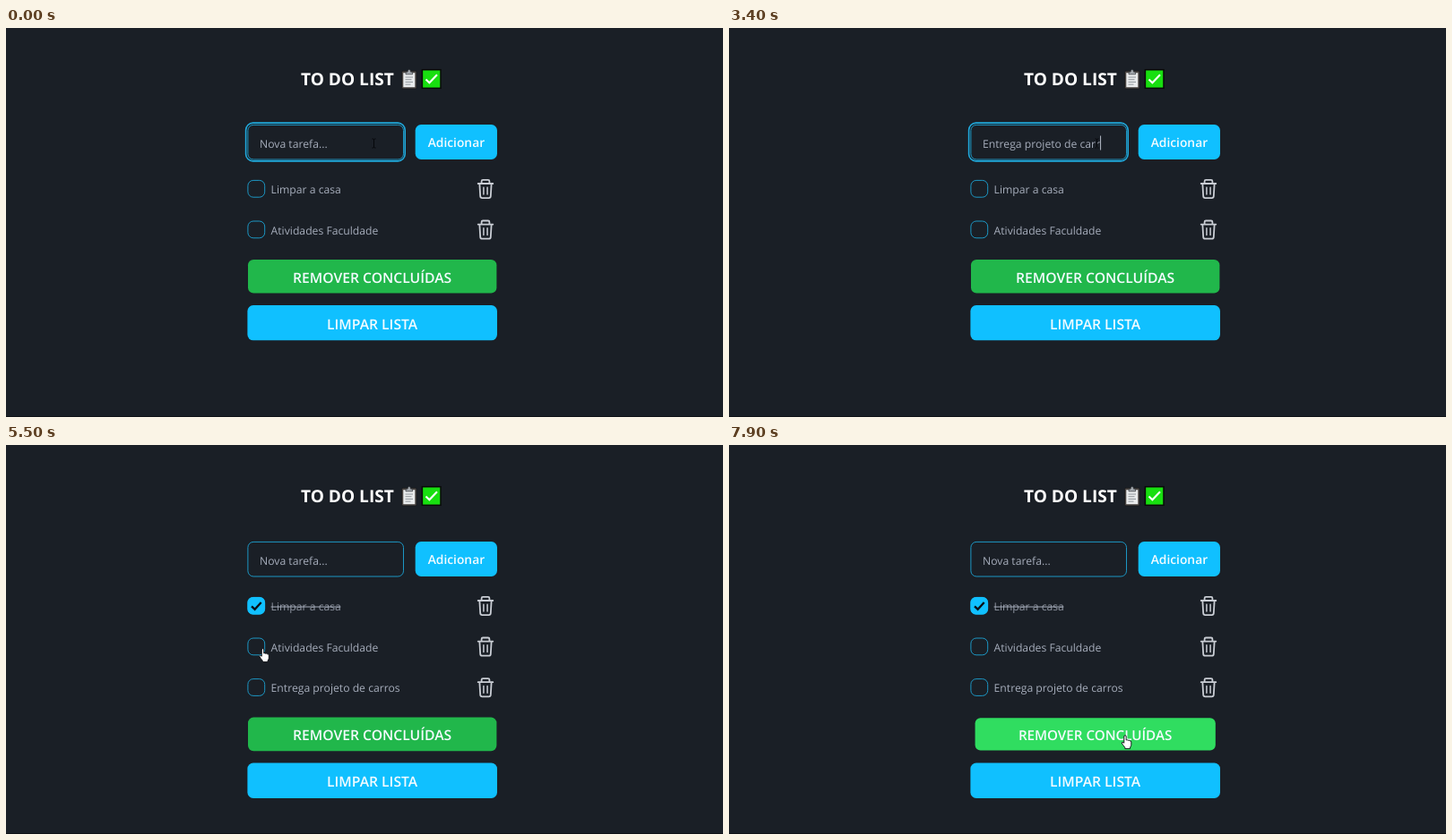
Recreate the animation shown at these times as an HTML page. Size 800 by 435 pixels, loop 8 s.

```html
<!DOCTYPE html>
<html lang="pt-BR">
<head>
<meta charset="utf-8">
<title>To do list</title>
<style>
  html, body { margin: 0; width: 100%; height: 100%; overflow: hidden; background: #1a1f26; }
  svg { display: block; }
  text { font: 12.2px "Open Sans", "Noto Sans", sans-serif; fill: #a6adbb; white-space: pre; text-rendering: geometricPrecision; }
  .title { font-size: 19.1px; font-weight: 700; fill: #fff; }
  .label { font-size: 15.7px; font-weight: 600; fill: #f4fbff; text-anchor: middle; }
  .label.small { font-size: 13.8px; }
  .blue { fill: #10c0ff; }
  .frame { fill: none; stroke: #1c97c4; }
  .hand, .arrow { fill: #fff; stroke: #0b0d11; stroke-width: .9; stroke-linejoin: round; }
</style>
</head>
<body>
<svg width="800" height="435" viewBox="0 0 800 435">
  <defs>
    <g id="trash" fill="none" stroke="#c9cdd4" stroke-width="1.8" stroke-linecap="round" stroke-linejoin="round">
      <path d="M526.7 174H543.3M530.6 173.5V171.4Q530.6 169.9 532.1 169.9H537.9Q539.4 169.9 539.4 171.4V173.5"/>
      <path d="M528.4 174.4L529.2 188.2Q529.4 190.1 531.2 190.1H538.8Q540.6 190.1 540.8 188.2L541.6 174.4"/>
      <path d="M532.9 178.2V186M537.1 178.2V186" stroke-width="1.5"/>
    </g>
  </defs>

  <rect width="800" height="435" fill="#1a1f26"/>
  <rect y="434" width="800" height="1" fill="#0e1116"/>

  <text class="title" x="329" y="64">TO DO LIST</text>
  <g id="clipboard">
    <rect x="441.5" y="48" width="16.6" height="20" rx="1.5" fill="#4b4643" stroke="#15171b" stroke-width=".8"/>
    <rect x="443.3" y="50.2" width="13" height="16" fill="#e9ebec"/>
    <path d="M446 51.8V49.2H448Q448.2 46.4 449.8 46.4T451.6 49.2H453.6V51.8Z" fill="#a3a8ad" stroke="#33363a" stroke-width=".7"/>
    <path d="M445.5 55H454M445.5 57.7H452.5M445.5 60.4H454M445.5 63.1H451.5" stroke="#8f959b"/>
  </g>
  <g id="badge">
    <rect x="464.4" y="46.7" width="20.6" height="20.6" fill="#18df10" stroke="#080a08" stroke-width="1.5"/>
    <path d="M468.5 57.5L472.4 61.3L481 52.2" fill="none" stroke="#fff" stroke-width="2.1"/>
  </g>

  <rect id="focus" class="frame" x="267.6" y="106.1" width="177.6" height="42.8" rx="8" stroke-width="1.6" style="stroke:#20a9dc"/>
  <rect class="frame" x="269.9" y="108.4" width="173.6" height="38.6" rx="6.2"/>
  <text id="entry" x="283" y="133.5" xml:space="preserve"></text>
  <rect id="caret" y="120.5" width="1" height="16" fill="#b4bac6"/>
  <rect class="blue" x="456.7" y="108" width="91.3" height="39" rx="6.5"/>
  <text class="label small" x="502.4" y="133.4">Adicionar</text>

  <g id="items"></g>

  <g id="buttons">
    <g id="remove">
      <rect x="270" y="259" width="277.4" height="37.6" rx="6.2"/>
      <text class="label" x="408.6" y="284.7">REMOVER CONCLUÍDAS</text>
    </g>
    <rect class="blue" x="269.4" y="310" width="278.6" height="39.3" rx="6.5"/>
    <text class="label" x="408.6" y="336.8">LIMPAR LISTA</text>
  </g>

  <g id="pointer">
    <path data-kind="beam" d="M-2 -5H-.6L0 -4.4L.6 -5H2M0 -4.4V4.4M-2 5H-.6L0 4.4L.6 5H2" fill="none" stroke="#05070a"/>
    <path data-kind="arrow" class="arrow" d="M0 0V12L2.8 9.4L4.6 13.5L6.4 12.7L4.7 8.7H8.5Z"/>
    <path data-kind="hand" class="hand" d="M-1.2 1Q-1.2 -.3 0 -.3T1.2 1V5Q2.2 4.3 3.2 5.3Q4.2 4.7 5.1 5.8Q6.6 5.3 6.8 7V10.2Q6.6 12 5.6 13V14.6H-.2V13.2Q-2.6 10.6 -3.9 8Q-3.6 6.4 -1.2 8.2Z"/>
  </g>
</svg>
<script>
const LOOP = 8000, TICK = 100, ROW = 45.6;
const TASK = "Entrega projeto de carros";
const ADDED = 3700, BLURRED = 5000, CHECKED = 5100, PRESSED = 7800;

// [time, typed letters]
const typing = [[400, 0], [500, 1], [1500, 12], [2300, 17], [3100, 22], [3300, 22], [3400, 23], [3600, 25]];
// [time, x, y]
const route = [
  [0, 410.5, 129], [3600, 410.5, 129], [3700, 410, 130], [4600, 410, 130],
  [5000, 281, 181], [5200, 281, 182], [5500, 286.5, 228], [5900, 283, 270],
  [6400, 282, 276], [6500, 282, 276], [6800, 305, 322], [7000, 328, 336],
  [7200, 337, 357], [7400, 352, 359], [7700, 442, 325], [8000, 442, 325]
];
const pointerKinds = [[0, "beam"], [4700, "arrow"], [5000, "hand"], [5300, "arrow"], [5400, "hand"],
  [5700, "arrow"], [5800, "hand"], [6600, "arrow"], [6700, "hand"]];
const hover = [[6700, 0], [6900, 1], [7100, 1], [7300, 0], [7500, 0], [7700, 1]];
const press = [[PRESSED - 100, 1], [PRESSED, .967]];
const caretOn = [[100, 400], [500, 3900], [4400, 4900]];

const el = id => document.getElementById(id);
const show = (node, on) => node.style.display = on ? "" : "none";
const mix = (a, b, p) => a + (b - a) * p;

function sample(steps, t, column = 1) {
  const next = steps.findIndex(step => step[0] > t);
  if (next === 0) return steps[0][column];
  if (next < 0) return steps[steps.length - 1][column];
  const a = steps[next - 1], b = steps[next];
  return mix(a[column], b[column], (t - a[0]) / (b[0] - a[0]));
}

el("items").innerHTML = ["Limpar a casa", "Atividades Faculdade", TASK].map((name, i) => `
  <g transform="translate(0 ${i * ROW})">
    <rect class="frame" x="269.9" y="170.4" width="18.8" height="18.8" rx="6"/>
    <text x="295.6" y="185">${name}</text>
    <use href="#trash"/>
    <g class="done">
      <rect class="blue" x="269.4" y="170" width="19.6" height="19.6" rx="6"/>
      <path d="M274 180.4L277.6 183.7L284.7 176" fill="none" stroke="#0b1118" stroke-width="2.4"/>
      <path d="M295.6 181H373.4" stroke="#a6adbb"/>
    </g>
  </g>`).join("");

const rows = [...el("items").children];
const pointers = [...el("pointer").children];
const removeBox = el("remove").firstElementChild;

function draw(t) {
  const added = t >= ADDED;
  const typed = added ? 0 : Math.floor(sample(typing, t) + 1e-6);
  const entry = el("entry");
  entry.textContent = typed ? TASK.slice(0, typed) : "Nova tarefa...";
  el("caret").setAttribute("x", 283 + (typed ? entry.getComputedTextLength() : 0));
  show(el("caret"), caretOn.some(([from, to]) => t >= from && t < to));
  show(el("focus"), t < BLURRED);

  rows.forEach((row, i) => {
    show(row, i < 2 || added);
    show(row.querySelector(".done"), i === 0 && t >= CHECKED);
  });
  rows[0].querySelector("text").style.fill = t >= CHECKED ? "#8d939f" : "";
  el("buttons").setAttribute("transform", `translate(0 ${added ? ROW : 0})`);

  const glow = sample(hover, t), scale = sample(press, t);
  removeBox.setAttribute("fill", `rgb(${mix(33, 48, glow)} ${mix(183, 221, glow)} ${mix(75, 96, glow)})`);
  el("remove").setAttribute("transform", `translate(408.7 277.8) scale(${scale}) translate(-408.7 -277.8)`);

  const kind = pointerKinds.filter(([from]) => from <= t).pop()[1];
  pointers.forEach(node => show(node, node.dataset.kind === kind));
  el("pointer").setAttribute("transform", `translate(${sample(route, t, 1)} ${sample(route, t, 2)})`);
}

const start = performance.now();
function play() {
  const t = (performance.now() - start) % LOOP;
  draw(Math.floor(t / TICK) * TICK);
  requestAnimationFrame(play);
}
play();
</script>
</body>
</html>
```
